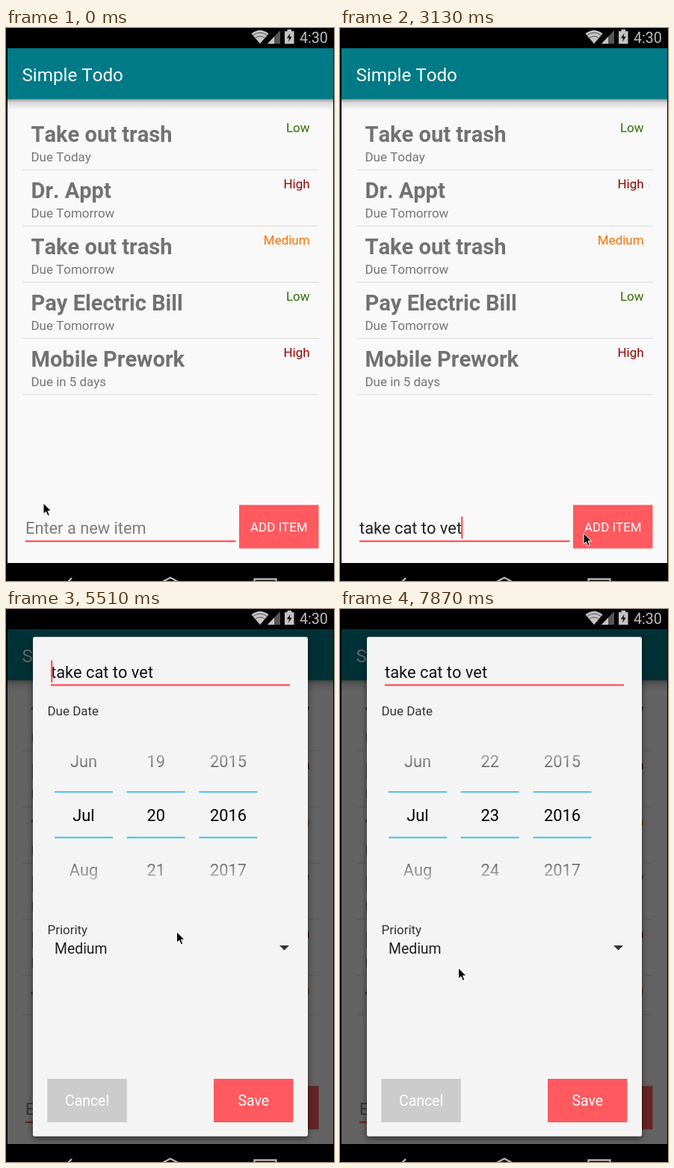
Animation of 439x738 px, one loop 8 s. Source, as an HTML page:

```html
<!DOCTYPE html>
<html lang="en">
<head>
<meta charset="utf-8">
<title>Todo list</title>
<style>
  html, body { margin: 0; width: 100%; height: 100%; overflow: hidden; background: #000; }
  svg { display: block; width: 439px; height: 738px; font-family: Roboto, sans-serif; font-kerning: none; }
  text { white-space: pre; }
  #dialog { filter: drop-shadow(0 3px 4px rgba(0, 0, 0, .5)); transform-origin: 220px 370.5px; }
</style>
</head>
<body>
<svg id="stage" viewBox="0 0 439 738"></svg>
<script>
const ACCENT = '#ff5a5f', TEAL = '#007a87', PHRASE = 'take cat to vet', PITCH = 72.6;
const COLORS = { Low: '#2f7000', Medium: '#ff7000', High: '#990000' };
const TASKS = [
  ['Take out trash', 'Due Today', 'Low'],
  ['Dr. Appt', 'Due Tomorrow', 'High'],
  ['Take out trash', 'Due Tomorrow', 'Medium'],
  ['Pay Electric Bill', 'Due Tomorrow', 'Low'],
  ['Mobile Prework', 'Due in 5 days', 'High'],
  [PHRASE, '', 'Medium']
];

// The screen refreshes in even ticks; tick 0 is the first key press
const LOOP = 8000, START = 450, TICK = 148.3;
const TYPED = 12, ADD = 22, OPEN = 32, DRAG = 38;

// Pointer legs: start tick, end tick, destination
const LEGS = [
  [14, 20, 345, 677], [23, 29, 237, 528.5], [33, DRAG, 217, 300],
  [DRAG, 41, 219, 171], [43, 47, 215, 240], [47, 50, 158.5, 479]
];

const clamp = v => Math.max(0, Math.min(1, v));
const ease = (n, from, to) => 1 - (1 - clamp((n - from) / (to - from))) ** 2.5;
const blink = (n, since) => Math.floor((n - since) * TICK / 500) % 2 === 0;
const pointer = n => LEGS.reduce(([x, y], [from, to, toX, toY]) => {
  const f = ease(n, from, to);
  return [x + (toX - x) * f, y + (toY - y) * f];
}, [50, 634]);

const rect = (x, y, w, h, fill, extra = '') =>
  `<rect x="${x}" y="${y}" width="${w}" height="${h}" fill="${fill}" ${extra}/>`;
const text = (x, y, size, str, fill, extra = '') =>
  `<text x="${x}" y="${y}" font-size="${size}" fill="${fill}" ${extra}>${str}</text>`;
const MID = 'text-anchor="middle"', END = 'text-anchor="end"';

const task = ([name, due, level], i) => {
  const y = 75 * i;
  return `<g id="task${i}">` +
    text(33.5, 152 + y, 29.05, name, '#727272', 'font-weight="700"') +
    text(33.5, 178 + y, 16.95, due, '#757575') +
    text(406.5, 139 + y, 16.95, level, COLORS[level], END) +
    rect(22, (due ? 188.7 : 166) + y, 397, 1.2, '#dedede') + '</g>';
};

const wheel = (x, id, values) => `<g id="${id}">` +
  values.map((v, i) => text(x, 283.4 + (i - 1) * PITCH, 21.8, v, 'url(#fade)', MID)).join('') + '</g>' +
  [243, 303.8].map(y => rect(x - 39, y, 78, 2.4, '#66c4ea')).join('');

const button = (x, y, label, fill, size) =>
  rect(x, y, 106.5, 58, fill) + text(x + 53.3, y + 29.3 + size * .355, size, label, '#fff', MID);

stage.innerHTML = `
<defs>
  <linearGradient id="fade" gradientUnits="userSpaceOnUse" x1="0" x2="0" y1="174" y2="376">
    <stop offset="0" stop-opacity="0"/><stop offset=".32"/><stop offset=".68"/><stop offset="1" stop-opacity="0"/>
  </linearGradient>
  <linearGradient id="shade" x2="0" y2="1">
    <stop offset="0" stop-opacity=".38"/><stop offset=".35" stop-opacity=".13"/><stop offset="1" stop-opacity=".02"/>
  </linearGradient>
</defs>
${rect(0, 0, 439, 738, '#000')}
<g fill="#c4c4c4">
  <path d="M340 21L328.5 7.5Q340 -1.5 351.5 7.5Z"/>
  <path d="M331 9.5Q340 3 349 9.5M334 13Q340 9 346 13" fill="none" stroke="#555"/>
  <path d="M367 3V21H350Z" fill="#555"/><path d="M359 11.5V21H350Z"/>
  <path d="M376.5 2H382V4.2H385.5V21H373V4.2H376.5Z"/>
  <path d="M380.5 7L375.8 13.5H379L378 18.5L382.8 11.5H379.6Z" fill="#111"/>
</g>
${text(393, 19.8, 19.6, '4:30', '#bdbdbd')}
${rect(2, 27, 436, 687, '#f9f9f9')}
${rect(2, 95, 436, 13, 'url(#shade)')}
${rect(2, 27, 436, 68, TEAL)}
${text(21.5, 70.5, 24.2, 'Simple Todo', '#fff')}
${TASKS.map(task).join('')}
${text(26, 675, 21.8, 'Enter a new item', '#7d7d7d', 'id="hint"')}
${text(26, 675, 21.8, '', '#202020', 'id="field"')}
${rect(26, 683.7, 281.5, 2.4, ACCENT)}
${rect(26, 652, 2.4, 29.5, ACCENT, 'id="caret"')}
${button(312, 636.5, 'ADD ITEM', ACCENT, 16.95)}
<path d="M88 734L80 742M204 742L220 733.5L236 742M332.5 742V735.5H361.5V742" fill="none" stroke="#b5b5b5" stroke-width="2.4"/>
${rect(2, 27, 436, 687, '#000', 'id="dim"')}
<g id="dialog">
  ${rect(36, 37.3, 368, 666.5, '#f4f4f4', 'rx="2.4"')}
  ${text(60, 92, 21.8, PHRASE, '#111')}
  ${rect(60, 100.3, 320, 2.4, ACCENT)}
  ${rect(60, 68.5, 2.4, 29.5, ACCENT, 'id="dialogCaret"')}
  ${text(55.5, 141.5, 16.95, 'Due Date', '#333')}
  ${wheel(104, 'months', ['Jun', 'Jul', 'Aug'])}
  ${wheel(200.7, 'days', ['', '', '', ''])}
  ${wheel(297.5, 'years', [2015, 2016, 2017])}
  ${text(55.5, 433.5, 16.95, 'Priority', '#333')}
  ${text(65, 460.3, 19.4, 'Medium', '#222')}
  <path d="M366 449H379L372.5 455.5Z" fill="#333"/>
  ${button(55.3, 627, 'Cancel', '#ccc', 19.4)}
  ${button(278, 627, 'Save', ACCENT, 19.4)}
</g>
<path id="mouse" d="M0 0V14.5L3.4 11.5L5.9 17L8.3 16L6 10.5H10.5Z" stroke="#fff"/>`;

const $ = id => document.getElementById(id);
const show = (id, on) => $(id).setAttribute('visibility', on ? 'visible' : 'hidden');

function draw(now) {
  const n = Math.floor((now % LOOP - START) / TICK);
  const added = n >= ADD, open = n >= OPEN;

  const count = n < 0 || added ? 0 : Math.round(1 + (PHRASE.length - 1) * clamp(n / TYPED));
  $('field').textContent = PHRASE.slice(0, count);
  show('hint', !count);
  show('task5', added);
  show('caret', added ? !open && blink(n, ADD) : n >= 0);
  $('caret').setAttribute('x', count ? 25 + $('field').getComputedTextLength() : 26);

  const entry = clamp(n - OPEN), dialog = $('dialog').style;
  show('dim', open);
  $('dim').setAttribute('opacity', .14 + .46 * clamp((n - OPEN) / 2));
  dialog.display = open ? '' : 'none';
  dialog.opacity = .74 + .26 * entry;
  dialog.transform = `scale(${.973 + .027 * entry})`;
  show('dialogCaret', open && blink(n, OPEN));

  const day = 20 + 3 * ease(n, DRAG, DRAG + 10);
  [...$('days').children].forEach((el, i) => {
    const value = Math.floor(day) - 1 + i;
    el.textContent = value;
    el.setAttribute('y', 283.4 + (value - day) * PITCH);
  });

  $('mouse').setAttribute('transform', `translate(${pointer(n)})`);
  requestAnimationFrame(draw);
}
requestAnimationFrame(draw);
</script>
</body>
</html>
```
